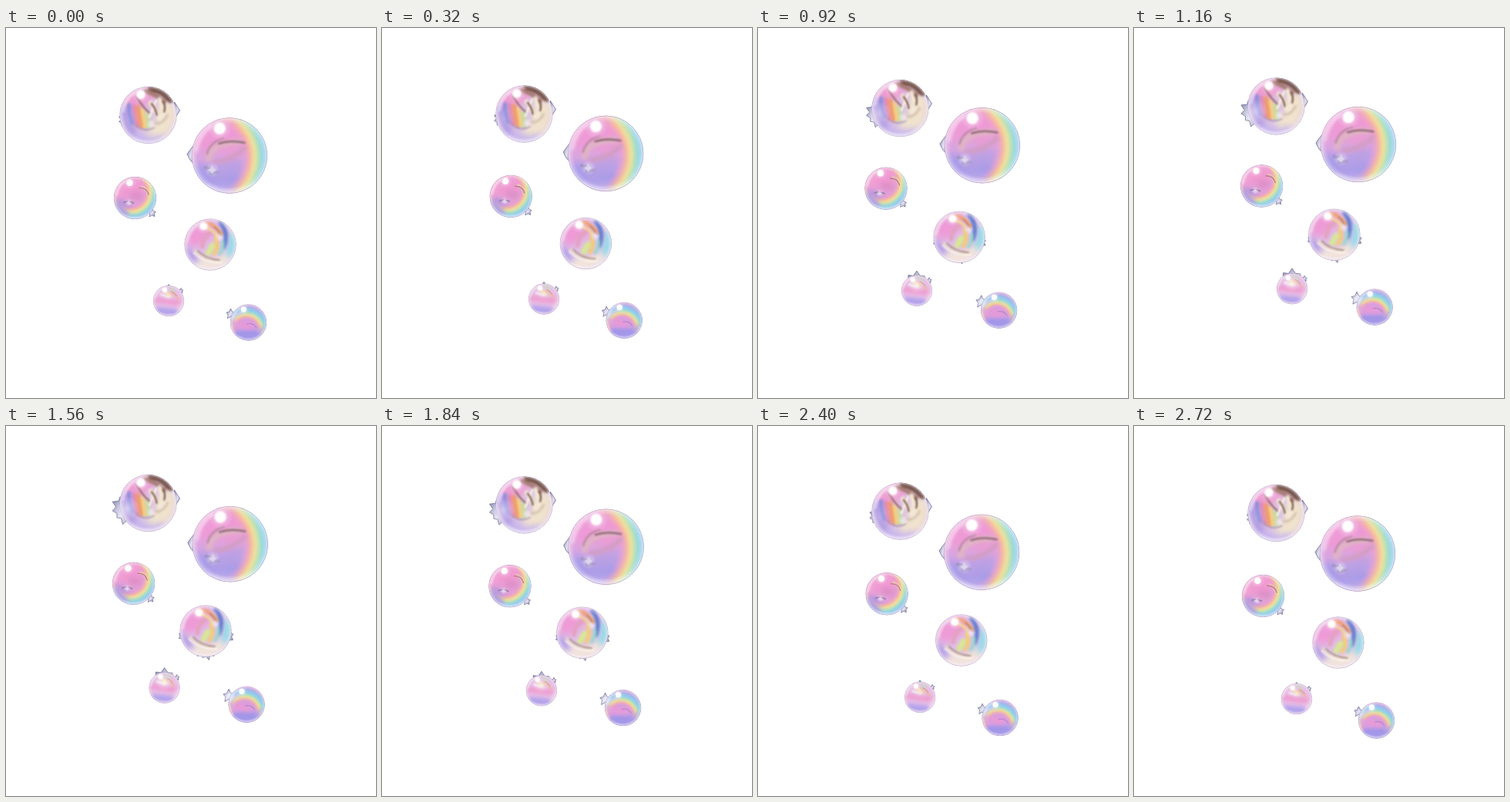
These frames come from a looping animation (480x480 px, 2.76 s). An HTML page:

```html
<!DOCTYPE html>
<html lang="en">
<head>
<meta charset="utf-8">
<title>Floating bubbles</title>
<style>
html, body { margin: 0; width: 100%; height: 100%; overflow: hidden; background: #fff; }
svg { display: block; width: 100vw; height: 100vh; }
</style>
</head>
<body>
<svg id="stage" viewBox="0 0 480 480">
  <defs>
    <clipPath id="ball"><circle r="50"/></clipPath>
    <filter id="soft" filterUnits="userSpaceOnUse" x="-80" y="-80" width="160" height="160" color-interpolation-filters="sRGB">
      <feGaussianBlur stdDeviation="6"/>
    </filter>
    <filter id="mid" filterUnits="userSpaceOnUse" x="-80" y="-80" width="160" height="160" color-interpolation-filters="sRGB">
      <feGaussianBlur stdDeviation="2.4"/>
    </filter>
    <filter id="fine" filterUnits="userSpaceOnUse" x="-80" y="-80" width="160" height="160" color-interpolation-filters="sRGB">
      <feGaussianBlur stdDeviation="1.2"/>
    </filter>
    <radialGradient id="rim" gradientUnits="userSpaceOnUse" cx="0" cy="0" r="50">
      <stop offset=".84" stop-color="#fff" stop-opacity="0"/>
      <stop offset=".95" stop-color="#fff" stop-opacity=".3"/>
      <stop offset=".98" stop-color="#fff" stop-opacity=".6"/>
      <stop offset="1" stop-color="#c9b4d8" stop-opacity=".8"/>
    </radialGradient>
    <radialGradient id="glow">
      <stop offset="0" stop-color="#fff" stop-opacity=".85"/>
      <stop offset="1" stop-color="#fff" stop-opacity="0"/>
    </radialGradient>
    <linearGradient id="chrome" x2="1" y2="1">
      <stop offset="0" stop-color="#7579a4"/>
      <stop offset=".5" stop-color="#e6e3f4"/>
      <stop offset="1" stop-color="#8d8bac"/>
    </linearGradient>
  </defs>
</svg>
<script>
const LOOP = 2760, STEP = 40;
const NS = 'http://www.w3.org/2000/svg';
const stage = document.getElementById('stage');
const RAINBOW = ['#f5a2c6', '#f7bd9c', '#f3e696', '#b9e6b2', '#8cdbe4', '#8ccbee', '#98bdea'];

// Paint layers use a ball radius of 50: [colour, width, path]; stars are in pixels.
// bow: centre x, centre y, inner radius, band width.
const bubbles = [
  {
    x: 184.5, y: 113, r: 37, dx: 0, dy: -13, top: 1480, base: '#dcc3e4',
    soft: [
      ['#ee9cd2', 30, 'M-30 -24L-6 -34'],
      ['#f0e3cc', 30, 'M32 -10Q36 14 14 32'],
      ['#a692e2', 14, 'M-42 -10Q-40 12 -26 32'],
      ['#c5b4ee', 14, 'M-24 38Q0 50 24 42']
    ],
    mid: [
      ['#5a3326', 13, 'M6 -49Q28 -44 40 -28'],
      ['#a77c74', 8, 'M-4 -42Q14 -36 28 -24'],
      ['#8d8fe0', 7, 'M-34 -18Q-34 0 -28 14'],
      ['#dd8bbc', 7, 'M-26 -16Q-25 2 -20 18'],
      ['#f09a6c', 8, 'M-18 -14Q-16 4 -12 20'],
      ['#f2cf84', 7, 'M-10 -8Q-7 6 -6 20'],
      ['#c2dea0', 6, 'M-2 -2Q2 10 0 22'],
      ['#f3e8d4', 7, 'M4 -22Q12 -10 20 6M20 -28Q28 -10 24 14'],
      ['#d3bfae', 4, 'M12 14Q24 18 34 0']
    ],
    fine: [
      ['#8c5f5c', 2.6, 'M-20 -32Q-10 -14 2 -4'],
      ['#fff8ea', 3, 'M2 4Q8 -12 14 -26'],
      ['#765248', 3, 'M6 -20Q14 -10 15 0M26 -24Q31 -16 28 -6'],
      ['#a590b4', 2, 'M-24 16Q-8 32 10 22']
    ],
    spark: [5, 16, 9],
    stars: [
      { x: -27, y: 7, n: 11, from: 12, to: 21.5, glow: 16 },
      { path: 'M34 -17L41 -6L33 7Z' }
    ]
  },
  {
    x: 290, y: 165.5, r: 49, dx: 1, dy: -14.5, top: 1140, base: '#dba6e0',
    soft: [
      ['#ee9ad6', 40, 'M-30 -24L4 -34'],
      ['#a79be8', 34, 'M-38 28L6 40'],
      ['#b8a0e4', 20, 'M-20 22L10 14'],
      ['#e89ed4', 20, 'M0 -4L22 -16']
    ],
    bow: [-28, 2, 51, 5.2],
    veil: [['#c0aeec', 14, 'M-24 48L2 47'], ['#e9a4d6', 10, 'M-6 -48L4 -44']],
    mid: [
      ['#dfb4c4', 8, 'M-28 4Q-24 -17 12 -18'],
      ['#cf9dc0', 5, 'M-20 8Q0 8 20 -10']
    ],
    fine: [
      ['#b08a9c', 2.2, 'M-30 -2Q-26 -18 -8 -23'],
      ['#86646e', 2.4, 'M-14 -16Q0 -21 20 -17'],
      ['#8f86b4', 3, 'M-32 16L-22 18M-26 24L-16 22']
    ],
    spark: [-23, 19, 10],
    stars: [{ path: 'M-46 -14Q-51 -8 -55 -2Q-52 7 -45 12Z' }]
  },
  {
    x: 167.5, y: 220.5, r: 27.5, dx: -2, dy: -16.7, top: 1400, base: '#e2a2d8',
    soft: [
      ['#f09ad2', 36, 'M-28 -20L8 -28'],
      ['#a694e2', 30, 'M-38 20L-16 36'],
      ['#dd8fc6', 18, 'M-4 -6L10 -4']
    ],
    bow: [-10, -14, 37, 5],
    veil: [
      ['#f0a4d4', 24, 'M-46 -10Q-42 -40 6 -50'],
      ['#ad9be6', 20, 'M-44 16L-24 40']
    ],
    mid: [['#ecd8a4', 5, 'M16 -26Q32 -20 34 -2']],
    fine: [
      ['#b47a92', 2.4, 'M10 -24Q28 -24 32 -8'],
      ['#9073a4', 3, 'M-26 10Q-14 6 -4 12']
    ],
    spark: [-15, 11, 10],
    stars: [{ x: 22, y: 19.5, n: 5, from: 6, to: 5.6 }]
  },
  {
    x: 265, y: 281, r: 33.5, dx: -6, dy: -15, top: 1540, base: '#e0bfe6',
    soft: [
      ['#ee9ad6', 36, 'M-30 -14L-10 -28'],
      ['#8adfe8', 16, 'M44 -16Q46 6 36 20'],
      ['#f3e8da', 20, 'M-20 36Q4 46 28 28'],
      ['#ab9ae6', 14, 'M-44 14L-32 30']
    ],
    mid: [
      ['#6a80d0', 9, 'M20 -42Q36 -22 26 4'],
      ['#e2a2c0', 8, 'M-16 4Q-12 -22 4 -24'],
      ['#f0a268', 6, 'M-8 -42Q12 -38 22 -20'],
      ['#f2d992', 5, 'M-14 -34Q4 -32 14 -16'],
      ['#d8e694', 11, 'M-4 16L4 2'],
      ['#f2cc74', 7, 'M8 18Q18 2 10 -12'],
      ['#96d8cc', 6, 'M18 18Q26 8 24 -6'],
      ['#e9dcc8', 5, 'M-30 12Q-10 32 18 30']
    ],
    fine: [
      ['#9a7c80', 2.2, 'M-24 12Q-10 28 18 30'],
      ['#fffaf0', 2.6, 'M-32 16Q-10 38 22 34'],
      ['#a8746a', 2, 'M8 -34Q18 -26 21 -16']
    ],
    spark: [19, -14, 10],
    stars: [
      { x: 0, y: 20, n: 13, from: 10, to: 18 },
      { x: 26, y: 6, n: 9, from: 6, to: 11 },
      { x: -27, y: 5, n: 9, from: 5, to: 9 }
    ]
  },
  {
    x: 211, y: 354, r: 20, dx: -6, dy: -16, top: 1260, base: '#e8bfe6',
    soft: [
      ['#ee9ace', 16, 'M-40 -4Q-10 2 34 6'],
      ['#b0a2ec', 22, 'M-34 32L22 38'],
      ['#eed6ea', 12, 'M34 34L44 10']
    ],
    mid: [
      ['#f2e4b0', 9, 'M-16 -34Q-2 -24 6 -14'],
      ['#b8e2b4', 6, 'M4 -44L18 -32'],
      ['#f2b494', 6, 'M6 -28Q22 -20 30 -6'],
      ['#f6ecf0', 7, 'M-24 -20L0 -12']
    ],
    fine: [['#bd9488', 2.4, 'M10 -30Q22 -26 26 -16']],
    stars: [
      { x: 0, y: -7, n: 9, from: 14.5, to: 19.5, glow: 11 },
      { x: 16, y: -13, n: 5, from: 3.5, to: 4 }
    ]
  },
  {
    x: 314.5, y: 382, r: 23.5, dx: -2.5, dy: -21.5, top: 1400, base: '#cda2e4',
    soft: [
      ['#e69ad8', 24, 'M-32 4L6 8'],
      ['#9c92e8', 28, 'M-30 38L28 38']
    ],
    bow: [-6, 22, 34, 4.8],
    veil: [
      ['#d8a6e2', 14, 'M-46 -8L-38 8'],
      ['#a498e8', 22, 'M-28 42L34 40'],
      ['#b4a4ea', 10, 'M28 26L44 16']
    ],
    mid: [['#dcc8ee', 6, 'M-42 -14Q-30 -26 -18 -26']],
    fine: [['#b088cc', 2.4, 'M-4 4Q12 0 22 14']],
    stars: [{ x: -23, y: -11, n: 5, from: 7, to: 9, glow: 8 }]
  }
];

function add(parent, tag, attrs) {
  const el = document.createElementNS(NS, tag);
  for (const k in attrs) el.setAttribute(k, attrs[k]);
  parent.appendChild(el);
  return el;
}

function strokes(parent, list, filter) {
  const g = add(parent, 'g', { fill: 'none', 'stroke-linecap': 'round', filter: `url(#${filter})` });
  for (const [stroke, width, d] of list) add(g, 'path', { stroke, 'stroke-width': width, d });
}

function rainbow(parent, [cx, cy, inner, band]) {
  const g = add(parent, 'g', { fill: 'none', filter: 'url(#mid)' });
  RAINBOW.forEach((stroke, i) => add(g, 'circle', {
    cx, cy, r: inner + i * band, stroke, 'stroke-width': band + 0.6, opacity: i ? 0.92 : 0.55
  }));
}

function starPath(n, r) {
  let d = '';
  for (let i = 0; i < n * 2; i++) {
    const a = Math.PI * i / n - Math.PI / 2;
    const q = i % 2 ? r * (n > 6 ? 0.7 : 0.5) : r * (1 - 0.08 * (i % 3));
    d += (i ? 'L' : 'M') + (q * Math.cos(a)).toFixed(2) + ' ' + (q * Math.sin(a)).toFixed(2);
  }
  return d + 'Z';
}

function build(b) {
  b.node = add(stage, 'g', {});
  const metal = { fill: 'url(#chrome)', stroke: '#64668e', 'stroke-width': 0.7, 'stroke-linejoin': 'round' };
  for (const s of b.stars) {
    s.node = add(b.node, 'path', { ...metal, d: s.path || '' });
    if (!s.path) s.node.setAttribute('transform', `translate(${s.x} ${s.y})`);
  }

  const ball = add(b.node, 'g', { transform: `scale(${b.r / 50})` });
  const inside = add(ball, 'g', { 'clip-path': 'url(#ball)' });
  add(inside, 'circle', { r: 50, fill: b.base });
  strokes(inside, b.soft, 'soft');
  if (b.bow) rainbow(inside, b.bow);
  if (b.veil) strokes(inside, b.veil, 'soft');
  strokes(inside, b.mid, 'mid');
  strokes(inside, b.fine, 'fine');
  strokes(inside, [['#ffffff88', 4, 'M-44 -6Q-40 -28 -24 -39'], ['#ffffff77', 3, 'M-30 40Q0 55 32 38']], 'mid');

  if (b.spark) {
    const [x, y, size] = b.spark;
    add(inside, 'circle', { cx: x, cy: y, r: size, fill: 'url(#glow)', opacity: 0.6 });
    add(inside, 'path', { d: starPath(4, size * 0.6), transform: `translate(${x} ${y})`, fill: '#e9e2f4', opacity: 0.6 });
  }
  add(inside, 'circle', { r: 50, fill: 'url(#rim)' });
  add(inside, 'circle', { cx: -13, cy: -36, r: 16, fill: 'url(#glow)', opacity: 0.6 });
  add(inside, 'circle', { cx: -13, cy: -36, r: 7.8, fill: '#fff', filter: 'url(#fine)' });
  add(b.node, 'circle', { r: b.r - 0.2, fill: 'none', stroke: '#b09abc', 'stroke-width': 0.6, opacity: 0.75 });
  for (const s of b.stars)
    if (s.glow) s.light = add(b.node, 'circle', { cx: s.x, cy: s.y, r: s.glow, fill: 'url(#glow)' });
}

const ease = p => (1 - Math.cos(Math.PI * p)) / 2;

function draw(t) {
  for (const b of bubbles) {
    const k = ease(t < b.top ? t / b.top : (LOOP - t) / (LOOP - b.top));
    b.node.setAttribute('transform', `translate(${b.x + b.dx * k} ${b.y + b.dy * k})`);
    for (const s of b.stars) {
      if (!s.path) s.node.setAttribute('d', starPath(s.n, s.from + (s.to - s.from) * k));
      if (s.light) s.light.setAttribute('opacity', 0.1 + 0.5 * k);
    }
  }
}

bubbles.forEach(build);
draw(0);
let start;
function tick(now) {
  if (start === undefined) start = now;
  draw(Math.floor(((now - start) % LOOP) / STEP) * STEP);
  requestAnimationFrame(tick);
}
requestAnimationFrame(tick);
</script>
</body>
</html>
```
